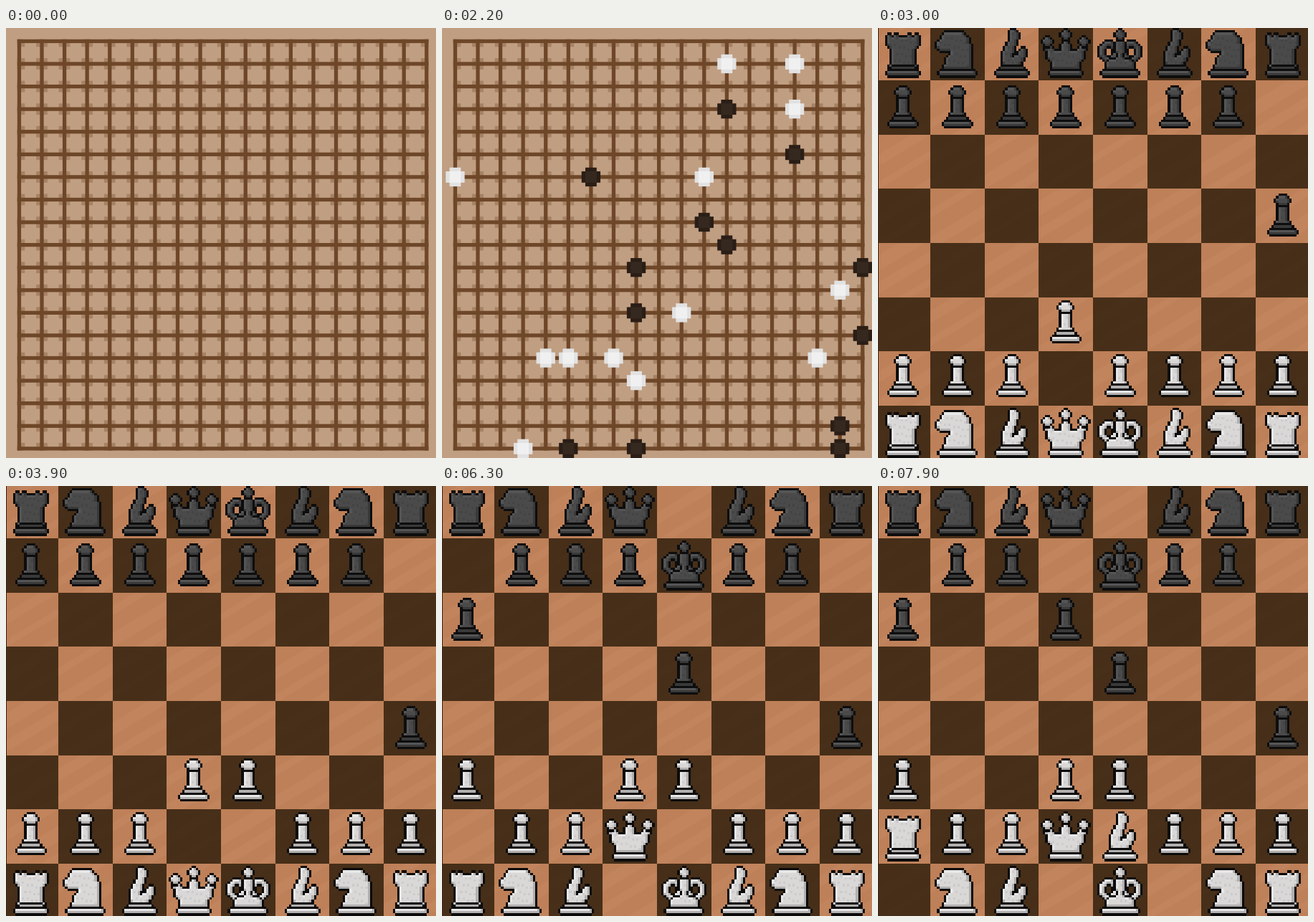
Animation of 600x600 px, one loop 8000 ms. Source, as an HTML page with a canvas:

```html
<!DOCTYPE html>
<html lang="en">
<head>
<meta charset="utf-8">
<title>Board games</title>
<style>
html, body { margin: 0; width: 100%; height: 100%; overflow: hidden; background: #c09e82; }
canvas { display: block; width: 600px; height: 600px; }
</style>
</head>
<body>
<canvas id="stage" width="600" height="600"></canvas>
<script>
const ctx = document.getElementById('stage').getContext('2d');
const LOOP = 8000, CHESS_AT = 3000;

function layer(w, h, paint) {
  const c = document.createElement('canvas');
  c.width = w;
  c.height = h;
  paint(c.getContext('2d'));
  return c;
}

function box(g, color, x, y, w, h) {
  g.fillStyle = color;
  g.fillRect(x, y, w, h);
}

// ---------- go ----------
const DOT = 600 / 114, STEP = DOT * 6;
const BLACK = 'gg is li sn pf im rs mj fs sk ik md rr ra dj hd eq ge'.split(' ');
const WHITE = 'mb fo pd rl ho km lg ip pb eo ds qo ag oc sg mp bc'.split(' ');

const goBoard = layer(600, 600, g => {
  box(g, '#c09e82', 0, 0, 600, 600);
  const start = 3 * DOT, span = 18 * STEP + DOT;
  g.save();
  g.beginPath();
  g.rect(start, start, span, span);
  g.clip();
  for (let r = 0; r < 19; r++) {
    for (let c = 0; c < 19; c++) {
      box(g, '#a68265', start + c * STEP - DOT, start + r * STEP - DOT, 3 * DOT, 3 * DOT);
    }
  }
  g.restore();
  for (let i = 0; i < 19; i++) {
    box(g, '#6e4628', start + i * STEP, start, DOT, span);
    box(g, '#6e4628', start, start + i * STEP, span, DOT);
  }
});

function stone(at, edge, core) {
  const x = (at.charCodeAt(0) - 97) * STEP + DOT;
  const y = (at.charCodeAt(1) - 97) * STEP + DOT;
  box(ctx, edge, x + DOT, y, 3 * DOT, 5 * DOT);
  box(ctx, edge, x, y + DOT, 5 * DOT, 3 * DOT);
  box(ctx, core, x + DOT, y + DOT, 3 * DOT, 3 * DOT);
}

function drawGo(t) {
  ctx.drawImage(goBoard, 0, 0);
  const count = Math.round(t * 12 / 1000);
  for (let i = 0; i < count && i < 35; i++) {
    if (i % 2) stone(WHITE[i >> 1], '#e2e2e2', '#f0f0f0');
    else stone(BLACK[i >> 1], '#2a1e16', '#35291f');
  }
}

// ---------- chess ----------
const TILE = 75.7, ORIGIN = -2.9, CELL = TILE / 24;
const edge = i => Math.round(ORIGIN + i * TILE);

const chessBoard = layer(600, 600, g => {
  for (let r = 0; r < 8; r++) {
    for (let c = 0; c < 8; c++) {
      const light = (r + c) % 2 === 0;
      const x = edge(c), y = edge(r);
      g.save();
      g.beginPath();
      g.rect(x, y, 76, 76);
      g.clip();
      box(g, light ? '#be8058' : '#462e18', x, y, 76, 76);
      g.fillStyle = light ? 'rgba(205,148,110,.22)' : 'rgba(84,57,31,.1)';
      for (let k = 0; k < 3; k++) {
        const top = y + 18 + k * 38 + (c * 17 + r * 29) % 23;
        const thick = 10 + (c * 5 + r * 3 + k * 7) % 13;
        g.beginPath();
        g.moveTo(x, top);
        g.lineTo(x + 76, top - 46);
        g.lineTo(x + 76, top - 46 + thick);
        g.lineTo(x, top + thick);
        g.fill();
      }
      g.restore();
    }
  }
  box(g, '#3a2412', 0, 0, 1, 600);
});

// Pieces are built from paths on a 24 x 24 grid.
function poly(...pts) {
  const path = new Path2D();
  for (let i = 0; i < pts.length; i += 2) path.lineTo(pts[i], pts[i + 1]);
  path.closePath();
  return path;
}

// Right half as pairs of distance from the axis and height, mirrored to the left.
function turned(...half) {
  const left = [];
  for (let i = half.length - 2; i >= 0; i -= 2) left.push(12 - half[i], half[i + 1]);
  return poly(...half.map((v, i) => i % 2 ? v : 12 + v), ...left);
}

function oval(x, y, rx, ry, hole = 0) {
  const path = new Path2D();
  path.ellipse(x, y, rx, ry, 0, 0, 7);
  path.closePath();
  if (hole) {
    path.moveTo(x + rx * hole, y);
    path.ellipse(x, y, rx * hole, ry * hole, 0, 0, 7);
  }
  return path;
}

const foot = (half, bottom) => [
  turned(half, bottom - 2, half, bottom),
  turned(half - 2, bottom - 4, half - 2, bottom - 3)
];

const SHAPES = {
  p: [turned(2, 7, 2, 12, 3, 16), ...foot(6, 20), oval(12, 5, 3.2, 2.3)],
  r: [turned(2, 5, 2, 4, 4, 4, 4, 5, 5, 5, 5, 4, 7, 4, 7, 8, 5, 10, 5, 15, 6, 19), ...foot(7, 22)],
  n: [
    poly(5, 4, 7, 3, 14, 3, 17, 6, 18, 10, 18, 19, 6, 19, 7, 15, 10, 12, 9, 11, 5, 11, 3, 10, 3, 7, 5, 6),
    foot(8, 22)[0]
  ],
  b: [
    poly(11, 2, 14, 2, 15, 5, 13, 10, 12, 14, 15, 13, 16, 10, 18, 10, 18, 13, 15, 18, 10, 18, 8, 16, 8, 12, 11, 6),
    ...foot(7, 22)
  ],
  q: [
    turned(1, 6, 2, 11, 5, 11, 7, 8, 9, 8, 8, 14, 6, 17, 6, 19), foot(7, 22)[0],
    oval(12, 4, 1.7, 1.7), oval(4, 7, 1.7, 1.7), oval(20, 7, 1.7, 1.7)
  ],
  k: [
    oval(7, 11.5, 4.2, 4.5, .55), oval(17, 11.5, 4.2, 4.5, .55),
    turned(1, 6, 2, 9, 1, 14, 6, 16, 6, 19), foot(8, 22)[0],
    oval(12, 4, 1.7, 1.7)
  ]
};

const TONES = {
  w: { line: '#0c0b0b', body: '#d9d8d7', high: '#e8e7e7', low: '#b2afaf', spot: '#cdcbcb' },
  b: { line: '#0d0d0e', body: '#4a4a4b', high: '#555556', low: '#39393a', spot: '#444445' }
};

function sprite(parts, tone) {
  return layer(76, 76, g => {
    const cell = (color, x, y) => {
      const px = Math.round(x * CELL), py = Math.round(y * CELL);
      box(g, color, px, py, Math.round((x + 1) * CELL) - px, Math.round((y + 1) * CELL) - py);
    };
    for (const path of parts) {
      const inside = (x, y) => g.isPointInPath(path, x + .5, y + .5, 'evenodd');
      for (let y = 0; y < 24; y++) {
        for (let x = 0; x < 24; x++) {
          const up = inside(x, y - 1), down = inside(x, y + 1);
          const left = inside(x - 1, y), right = inside(x + 1, y);
          if (inside(x, y)) {
            let color = tone.body;
            if (!down || !right) color = tone.low;
            else if (!up || !left) color = tone.high;
            else if ((x * 7 + y * 11) % 13 < 2) color = tone.spot;
            cell(color, x, y);
          } else if (up || down || left || right) {
            cell(tone.line, x, y);
          }
        }
      }
    }
  });
}

const sprites = {};
for (const side of 'wb') {
  for (const kind in SHAPES) sprites[side + kind] = sprite(SHAPES[kind], TONES[side]);
}

const MOVES = 'h7h5 d2d3 h5h4 e2e3 e7e5 d1d2 a7a6 a2a3 e8e7 a1a2 d7d6 f1e2'.split(' ');

function position(count) {
  const men = {};
  [...'abcdefgh'].forEach((file, i) => {
    men[file + 8] = 'b' + 'rnbqkbnr'[i];
    men[file + 7] = 'bp';
    men[file + 2] = 'wp';
    men[file + 1] = 'w' + 'rnbqkbnr'[i];
  });
  for (const move of MOVES.slice(0, count)) {
    const from = move.slice(0, 2);
    men[move.slice(2)] = men[from];
    delete men[from];
  }
  return men;
}

// Pawns sit a little off the other pieces' baseline.
const SHIFT = { wp: -2, bp: 1 };

function drawChess(t) {
  ctx.drawImage(chessBoard, 0, 0);
  const men = position(Math.floor((t - 1700) / 500));
  for (const at in men) {
    const man = men[at];
    ctx.drawImage(sprites[man], edge(at.charCodeAt(0) - 97), edge(8 - at[1]) + (SHIFT[man] || 0));
  }
}

const begin = performance.now();
function frame() {
  const t = (performance.now() - begin) % LOOP;
  if (t < CHESS_AT) drawGo(t);
  else drawChess(t);
  requestAnimationFrame(frame);
}
frame();
</script>
</body>
</html>
```
